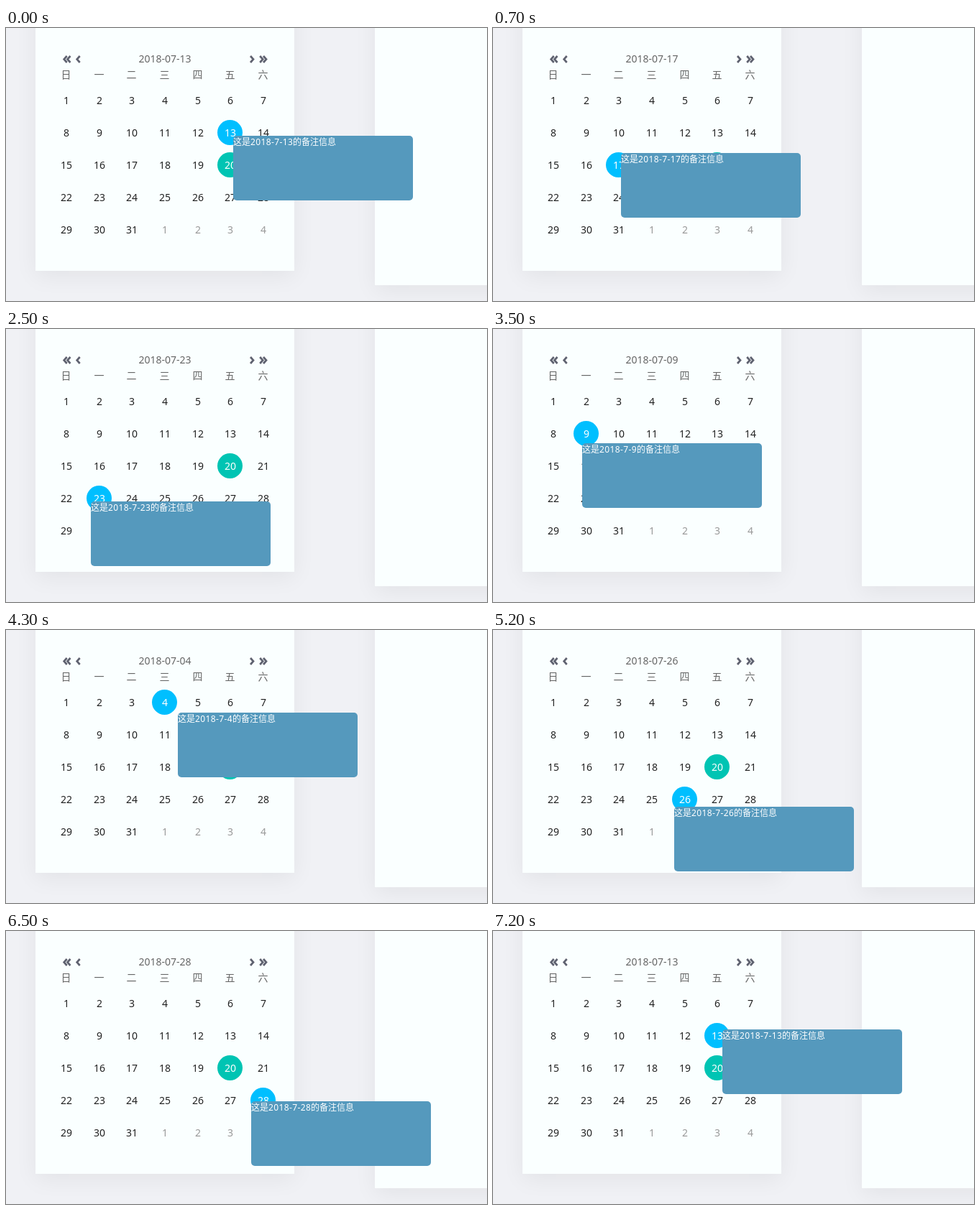
Animation, 669 px wide and 380 px high, one loop 7900 ms. Source, as an HTML page with a canvas:

```html
<!DOCTYPE html>
<html lang="zh">
<head>
<meta charset="utf-8">
<title>Calendar notes</title>
<style>
html, body { margin: 0; width: 100%; height: 100%; overflow: hidden; background: #f0f1f5; }
canvas { display: block; }
</style>
</head>
<body>
<canvas id="stage" width="669" height="380"></canvas>
<script>
const ctx = document.getElementById('stage').getContext('2d');
const LOOP = 7900, STEP = 100;
const LATIN = '"Noto Sans", "Open Sans", sans-serif';
const CJK = '"Noto Sans CJK SC", "Noto Sans CJK", sans-serif';
const BLUE = '#00bfff', GREEN = '#00c4b3', TODAY = 20;
const COL = 45.67, ROW = 45, LEFT = 83.5, TOP = 100.5;

// The pointer rests between straight moves, sampled every STEP ms.
const home = { x: 316, y: 150 };
const moves = [
  { at: 300, steps: 2, x: 209, y: 155 },
  { at: 600, steps: 5, x: 131, y: 203 },
  { at: 1100, steps: 3, x: 81, y: 145 },
  { at: 1500, steps: 1, x: 77, y: 155 },
  { at: 1900, steps: 2, x: 77, y: 266 },
  { at: 2500, steps: 1, x: 118, y: 240 },
  { at: 2800, steps: 2, x: 119, y: 221 },
  { at: 3100, steps: 5, x: 124, y: 159 },
  { at: 3600, steps: 3, x: 160, y: 138 },
  { at: 3900, steps: 2, x: 181, y: 133 },
  { at: 4300, steps: 2, x: 296, y: 97 },
  { at: 4900, steps: 3, x: 310, y: 241 },
  { at: 5200, steps: 1, x: 252, y: 246 },
  { at: 5300, steps: 1, x: 226, y: 222 },
  { at: 5600, steps: 3, x: 280, y: 137 },
  { at: 6000, steps: 1, x: 348, y: 96 },
  { at: 6100, steps: 1, x: 358, y: 88 },
  { at: 6300, steps: 3, x: 341, y: 237 },
  { at: 6900, steps: 2, x: 143, y: 290 },
  { at: 7100, steps: 2, x: 319, y: 137 }
];

function pointerAt(time) {
  let pos = home;
  for (const move of moves) {
    if (time < move.at) break;
    const k = Math.min(1, (Math.floor((time - move.at) / STEP) + 1) / move.steps);
    pos = {
      x: Math.round(pos.x + (move.x - pos.x) * k),
      y: Math.round(pos.y + (move.y - pos.y) * k)
    };
  }
  return pos;
}

const dayAt = ({ x, y }) => Math.round((y - TOP) / ROW) * 7 + Math.round((x - LEFT) / COL) + 1;
const colX = col => Math.round(LEFT - 0.5 + col * COL) + 0.5;
const rowY = row => TOP + row * ROW;

function label(text, x, y, color, font, align = 'center') {
  ctx.font = font;
  ctx.textAlign = align;
  ctx.fillStyle = color;
  ctx.fillText(text, x, y);
}

function card(x, w, bottom) {
  ctx.save();
  ctx.shadowColor = 'rgba(0, 0, 0, 0.06)';
  ctx.shadowBlur = 30;
  ctx.shadowOffsetY = 8;
  ctx.fillStyle = '#faffff';
  ctx.fillRect(x, -100, w, bottom + 100);
  ctx.restore();
}

function chevron(x, dir) {
  ctx.beginPath();
  ctx.moveTo(x - dir * 4, 39);
  ctx.lineTo(x, 43.5);
  ctx.lineTo(x - dir * 4, 48);
  ctx.stroke();
}

function drawHeader(day) {
  ctx.strokeStyle = '#5f6270';
  ctx.lineWidth = 2.7;
  [80.7, 85.5, 98.7].forEach(x => chevron(x, -1));
  [344, 357.2, 362].forEach(x => chevron(x, 1));
  label('2018-07-' + String(day).padStart(2, '0'), 221, 48, '#666', '14px ' + LATIN);
  [...'日一二三四五六'].forEach((name, i) => label(name, colX(i), 70, '#666', '14px ' + CJK));
}

function drawDays(selected) {
  for (let i = 0; i < 35; i++) {
    const day = i + 1, x = colX(i % 7), y = rowY(Math.floor(i / 7));
    const fill = day === selected ? BLUE : day === TODAY ? GREEN : null;
    if (fill) {
      ctx.fillStyle = fill;
      ctx.beginPath();
      ctx.arc(x, y, 17.5, 0, Math.PI * 2);
      ctx.fill();
    }
    const next = day > 31;
    const color = fill ? '#fff' : next ? '#999' : '#222';
    label(next ? day - 31 : day, x + 0.5, y + 5.5, color, '14px ' + LATIN);
  }
}

function drawNote({ x, y }, day) {
  ctx.fillStyle = '#5599bd';
  ctx.beginPath();
  ctx.roundRect(x, y, 250, 90, 5);
  ctx.fill();
  const date = '2018-7-' + day, base = y + 13;
  label('这是', x, base, '#fff', '500 12px ' + CJK, 'left');
  ctx.letterSpacing = '0.4px';
  label(date, x + 24, base, '#fff', '500 12px ' + LATIN, 'left');
  const end = x + 24 + Math.round(ctx.measureText(date).width);
  ctx.letterSpacing = '0px';
  label('的备注信息', end, base, '#fff', '500 12px ' + CJK, 'left');
}

function draw(time) {
  const pointer = pointerAt(time), day = dayAt(pointer);
  ctx.fillStyle = '#f0f1f5';
  ctx.fillRect(0, 0, 669, 380);
  card(41, 360, 338);
  card(513, 360, 358);
  drawHeader(day);
  drawDays(day);
  drawNote(pointer, day);
}

const begin = performance.now();
function tick() {
  draw((performance.now() - begin) % LOOP);
  requestAnimationFrame(tick);
}
tick();
</script>
</body>
</html>
```
